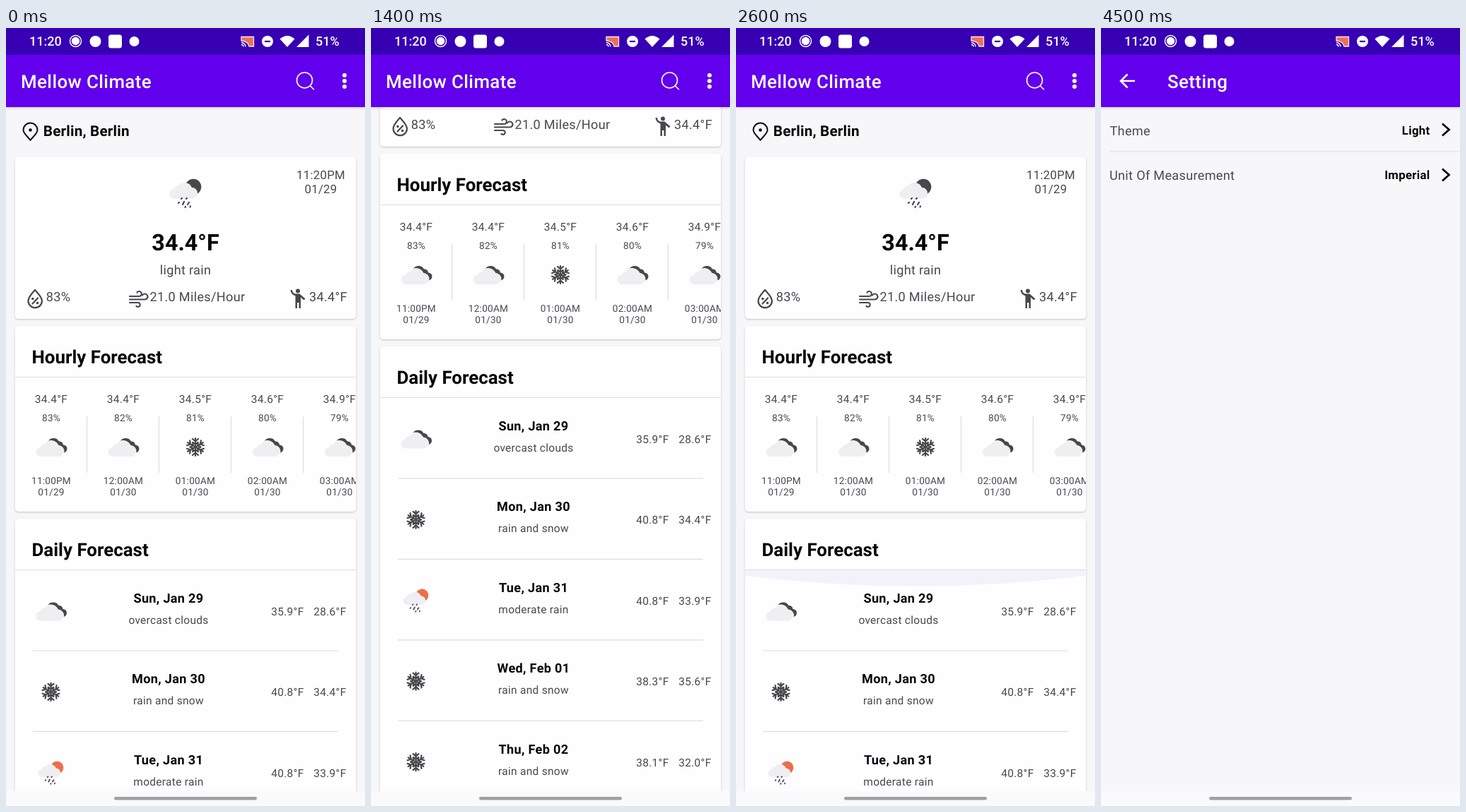
These frames come from a looping animation (508x1102 px, 5 s). An HTML page:

```html
<!DOCTYPE html>
<html lang="en">
<head>
<meta charset="utf-8">
<title>Weather app</title>
<style>
  html, body { margin: 0; width: 100%; height: 100%; overflow: hidden; background: #f7f6f9; }
  svg { display: block; width: 100%; height: 100%; }
  text { font-family: Roboto, "Noto Sans", sans-serif; text-rendering: geometricPrecision; fill: #49484b; }
  .mid { text-anchor: middle; }
  .end { text-anchor: end; }
  .s10 { font-size: 13.6px; letter-spacing: .24px; }
  .s12 { font-size: 15.5px; letter-spacing: .28px; }
  .s13 { font-size: 16.8px; letter-spacing: .3px; }
  .s14 { font-size: 18.1px; letter-spacing: .32px; }
  .s16 { font-size: 20.7px; letter-spacing: .19px; }
  .s20 { font-size: 25.9px; }
  .s25 { font-size: 32.3px; }
  .bold { font-weight: 700; fill: #060607; }
  .bar { font-size: 25.9px; font-weight: 500; letter-spacing: .4px; fill: #fff; }
  .status text { font-size: 18px; font-weight: 500; fill: #fff; }
  .card { fill: #fefdff; filter: drop-shadow(0 1px 1.2px rgba(0,0,0,.22)); }
  .appbar { fill: #6200ee; filter: drop-shadow(0 1px 2px rgba(0,0,0,.18)); }
  .rule { stroke: #dedde1; stroke-width: 1.2; }
  .line { fill: none; stroke: #48474a; stroke-width: 2.2; stroke-linecap: round; stroke-linejoin: round; }
  .dark { fill: #48484a; }
  .pale { fill: #efeef1; }

  .page, .touch, .glow, .menu, .settings { animation: 5s step-end infinite; }
  .page { animation-name: scroll; }
  .touch { animation-name: touch; }
  .glow { animation-name: glow; }
  .menu { animation-name: menu; }
  .settings { animation-name: settings; }

  @keyframes scroll {
    0% { transform: translateY(0); }
    16% { transform: translateY(-12px); }
    18% { transform: translateY(-82px); }
    20% { transform: translateY(-156px); }
    22% { transform: translateY(-223.7px); }
    24% { transform: translateY(-243px); }
    26% { transform: translateY(-244px); }
    42% { transform: translateY(-204px); }
    44% { transform: translateY(-114px); }
    46% { transform: translateY(-30px); }
    48% { transform: translateY(0); }
  }
  @keyframes touch {
    0% { opacity: 0; transform: translate(379.5px, 963px); }
    14% { opacity: 1; transform: translate(379.5px, 963px); }
    16% { opacity: 1; transform: translate(380px, 934px); }
    18% { opacity: 1; transform: translate(382px, 864px); }
    20% { opacity: 1; transform: translate(385px, 790px); }
    22% { opacity: 1; transform: translate(387px, 721.5px); }
    24% { opacity: .5; transform: translate(388px, 690px); }
    26% { opacity: 0; transform: translate(379px, 659px); }
    40% { opacity: 1; transform: translate(379px, 659px); }
    42% { opacity: 1; transform: translate(378px, 716px); }
    44% { opacity: 1; transform: translate(376px, 806px); }
    46% { opacity: 1; transform: translate(375px, 890px); }
    48% { opacity: 1; transform: translate(374px, 946px); }
    50% { opacity: 1; transform: translate(374px, 954px); }
    52% { opacity: 0; transform: translate(479px, 76px); }
    66% { opacity: 1; transform: translate(479px, 76px); }
    70% { opacity: 0; transform: translate(433px, 79px); }
    76% { opacity: 1; transform: translate(433px, 79px); }
    80% { opacity: 0; transform: translate(433px, 79px); }
  }
  @keyframes glow {
    0% { opacity: 0; }
    48% { opacity: 1; }
    50% { opacity: 1; }
    52% { opacity: .8; }
    60% { opacity: 0; }
  }
  @keyframes menu {
    0% { opacity: 0; }
    68% { opacity: .6; }
    70% { opacity: 1; }
    80% { opacity: .4; }
    82% { opacity: 0; }
  }
  @keyframes settings {
    0% { opacity: 0; transform: translateX(50px); }
    80% { opacity: .55; transform: translateX(42px); }
    82% { opacity: 1; transform: translateX(11px); }
    84% { opacity: 1; transform: translateX(3px); }
    86% { opacity: 1; transform: translateX(0); }
  }
</style>
</head>
<body>
<svg viewBox="0 0 508 1102" preserveAspectRatio="none">
  <defs>
    <clipPath id="view"><rect y="112" width="508" height="969"/></clipPath>
    <clipPath id="strip"><rect x="13" y="422" width="482" height="263"/></clipPath>

    <path id="cloud" class="pale" d="M-14 14a7 7 0 0 1-1-14 5.500 5.500 0 0 1 6-4.500 11 11 0 0 1 19 2.500A8 8 0 0 1 10 14Z"/>
    <g id="overcast">
      <path class="dark" d="M-5-7A9 9 0 0 1 11-8 6 6 0 0 1 17-3 5.500 5.500 0 0 1 17 8H8Z"/>
      <use href="#cloud" stroke="#fefdff" stroke-width="1"/>
    </g>
    <g id="rain">
      <circle cx="11" cy="-9" r="11.300"/>
      <use href="#cloud" x="-1" y="-6"/>
      <path class="line" stroke-width="2.400" d="M-5 7l-1 1M2 7l-1 1M-9 13l-1 1M-2 12l-2 4M5 13l-2 3M0 19l-.5 1M7 18.500l-.5 1"/>
    </g>
    <path id="arm" d="M0 0V-12.500M-4-11.500L0-8 4-11.500M-3.500-6.500L0-3.500 3.500-6.500"/>
    <g id="snow" class="line"></g>
    <path id="chevron" d="M483-8.500L492.500 0 483 8.500" fill="none" stroke="#060607" stroke-width="2.800"/>
  </defs>

  <rect width="508" height="1102" fill="#f7f6f9"/>

  <g clip-path="url(#view)">
    <g class="page">
      <path class="line" style="stroke:#111;stroke-width:2" d="M34.500 159C29 152 24.500 149 24.500 144.500a10 10 0 0 1 20 0C44.500 149 40 152 34.500 159Z"/>
      <circle cx="34.500" cy="144.500" r="2.300" fill="#111"/>
      <text class="s16 bold" x="52.800" y="153">Berlin, Berlin</text>

      <rect class="card" x="12.500" y="182" width="483" height="230" rx="5"/>
      <use href="#rain" class="dark" x="254" y="234"/>
      <text class="s13 mid" x="445.500" y="213.500">11:20PM</text>
      <text class="s13 mid" x="445.500" y="233.500">01/29</text>
      <text class="s25 bold mid" x="254" y="314.500">34.4°F</text>
      <text class="s14 mid" x="254" y="349">light rain</text>
      <g class="line">
        <path d="M41 371C36 377 31.500 381 31.500 386.500a9.700 9.700 0 0 0 19.400 0C51 381 46 377 41 371ZM37.500 390.500l7.500-8"/>
        <path d="M175 380h13.500a3.500 3.500 0 1 0-3-5.500M175 384.500h21.500a4 4 0 1 0-3.500-6M175 389h12a3 3 0 1 1-2.500 5"/>
      </g>
      <circle class="dark" cx="37.800" cy="383.500" r="1.800"/>
      <circle class="dark" cx="44.500" cy="389.500" r="1.800"/>
      <circle class="dark" cx="413" cy="372.500" r="3"/>
      <path class="dark" d="M402.500 371h2.500c.5 4 2.500 5.500 6 5.500h4.500l8 7-2 2-4.500-4V397h-2.500v-8h-2.500v8h-2.500V379.500C405 378 403 375 402.500 371Z"/>
      <text class="s14" x="56.800" y="387">83%</text>
      <text class="s14" x="203.500" y="387">21.0 Miles/Hour</text>
      <text class="s14 end" x="483" y="387">34.4°F</text>

      <rect class="card" x="12.500" y="422" width="483" height="263" rx="5"/>
      <text class="s20 bold" x="36.500" y="474.500">Hourly Forecast</text>
      <path class="rule" d="M13 494.500H495"/>
      <g id="hours" clip-path="url(#strip)"></g>

      <rect class="card" x="12.500" y="695" width="483" height="900" rx="5"/>
      <text class="s20 bold" x="36.500" y="747.500">Daily Forecast</text>
      <path class="rule" d="M13 767.500H495"/>
      <path class="glow" fill="#f4effb" d="M13 768H495V776Q254 805 13 776Z"/>
      <g id="days"></g>
    </g>
  </g>

  <rect class="appbar" y="38" width="508" height="74"/>
  <text class="bar" x="21" y="85">Mellow Climate</text>
  <g fill="none" stroke="#fff" stroke-width="1.600" stroke-linecap="round">
    <circle cx="422.500" cy="74" r="11"/><path d="M430.500 82l5 5"/>
  </g>
  <g fill="#fff"><circle cx="479" cy="67" r="3"/><circle cx="479" cy="75" r="3"/><circle cx="479" cy="83" r="3"/></g>

  <g class="menu">
    <rect x="244" y="43" width="259" height="84.500" rx="4" fill="#fefdff" style="filter:drop-shadow(0 2px 3px rgba(0,0,0,.3))"/>
    <text class="s16" x="264" y="94" style="fill:#222;letter-spacing:.4px">Setting</text>
  </g>

  <g class="settings">
    <rect y="38" width="508" height="1043" fill="#f7f6f9"/>
    <rect class="appbar" y="38" width="508" height="74"/>
    <path d="M48 75H28M37.500 65.500L28 75l9.500 9.500" fill="none" stroke="#fff" stroke-width="2.600"/>
    <text class="bar" x="94" y="85">Setting</text>
    <text class="s14" x="12.500" y="151.500">Theme</text>
    <text class="s13 bold end" x="465.500" y="150.500">Light</text>
    <use href="#chevron" y="144"/>
    <path class="rule" d="M13 175H508"/>
    <text class="s14" x="12" y="215">Unit Of Measurement</text>
    <text class="s13 bold end" x="465.500" y="214">Imperial</text>
    <use href="#chevron" y="208"/>
  </g>

  <g class="status">
    <rect width="508" height="38" fill="#3700b3"/>
    <text x="33" y="25">11:20</text>
    <circle cx="98.500" cy="18.500" r="8" fill="none" stroke="#fff" stroke-width="1.500"/>
    <g fill="#fff">
      <circle cx="98.500" cy="18.500" r="5.700"/>
      <circle cx="126.500" cy="19" r="8"/>
      <rect x="145" y="9.500" width="19" height="19" rx="3.500"/>
      <circle cx="181.500" cy="19" r="7"/>
      <circle cx="370" cy="19" r="8"/>
      <path d="M387.500 15.500Q398 6.500 408.500 15.500L398 27ZM428.500 9.500V27H411Z"/>
    </g>
    <path d="M366 19h8" stroke="#3700b3" stroke-width="2.200"/>
    <path d="M333 18V12.500H350.500V26H344Q343 19 333 18Z" fill="#ee7052" stroke="#f5e9f3" stroke-width="1.300"/>
    <path d="M333 20.500a6 6 0 0 1 6 6M333 23.500a3 3 0 0 1 3 3" fill="none" stroke="#fff" stroke-width="1.400"/>
    <text x="438" y="25">51%</text>
  </g>

  <rect y="1081" width="508" height="21" fill="#faf9fb"/>
  <rect x="153" y="1089" width="202" height="4.500" rx="2.200" fill="#a09fa2"/>
  <circle class="touch" r="15" fill="#fefdff" fill-opacity=".6" stroke="#d0cbe9" stroke-width="2"/>
</svg>

<script>
  const byId = id => document.getElementById(id);
  const text = (cls, x, y, str) => `<text class="${cls}" x="${x}" y="${y}">${str}</text>`;
  const icon = (name, x, y) => `<use href="#${name}" x="${x}" y="${y}"/>`;

  byId('snow').innerHTML = [0, 60, 120, 180, 240, 300]
    .map(a => `<use href="#arm" transform="rotate(${a})"/>`).join('');

  const hours = [
    ['34.4', 83, 'overcast', '11:00PM', '01/29'],
    ['34.4', 82, 'overcast', '12:00AM', '01/30'],
    ['34.5', 81, 'snow', '01:00AM', '01/30'],
    ['34.6', 80, 'overcast', '02:00AM', '01/30'],
    ['34.9', 79, 'overcast', '03:00AM', '01/30']
  ];
  byId('hours').innerHTML = hours.map(([temp, humidity, sky, time, date], i) => {
    const x = 64 + 102 * i;
    return text('s12 mid', x, 531, temp + '°F')
      + text('s10 mid', x, 556.5, humidity + '%')
      + icon(sky, x, 593.5)
      + text('s10 mid', x, 646, time)
      + text('s10 mid', x, 662, date)
      + `<path class="rule" d="M${x + 50.5} 550.500V630"/>`;
  }).join('');

  const days = [
    ['Sun, Jan 29', 'overcast clouds', 'overcast', '35.9', '28.6'],
    ['Mon, Jan 30', 'rain and snow', 'snow', '40.8', '34.4'],
    ['Tue, Jan 31', 'moderate rain', 'rain', '40.8', '33.9'],
    ['Wed, Feb 01', 'rain and snow', 'snow', '38.3', '35.6'],
    ['Thu, Feb 02', 'rain and snow', 'snow', '38.1', '32.0']
  ];
  byId('days').innerHTML = days.map(([date, note, sky, high, low], i) => {
    const sunny = sky === 'rain' ? 'translate(63.500 826) scale(.8)' : 'translate(63.500 826)';
    return `<g transform="translate(0 ${114.4 * i})">`
      + `<use href="#${sky}" fill="#ec6e4c" transform="${sunny}"/>`
      + text('s14 bold mid', 230, 814, date)
      + text('s12 mid', 230, 844, note)
      + text('s12 end', 421.5, 832, high + '°F')
      + text('s12 end', 481.5, 832, low + '°F')
      + '<path class="rule" d="M38 882H470"/></g>';
  }).join('');
</script>
</body>
</html>
```
